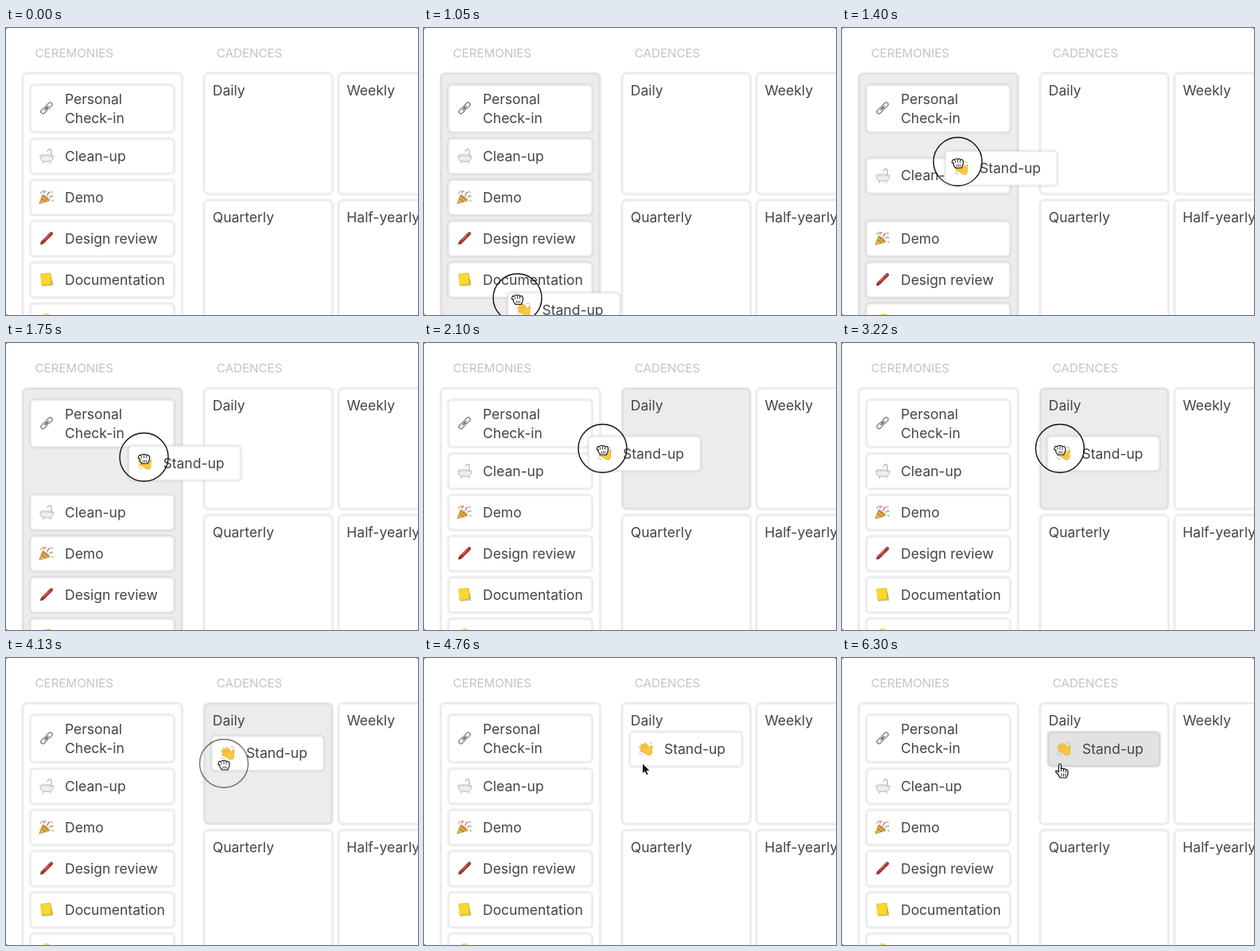
Animation of 518x362 px, one loop 6.79 s. Source, as an HTML page with a canvas:

```html
<!DOCTYPE html>
<html lang="en">
<head>
<meta charset="utf-8">
<title>Ceremony planner</title>
<style>
  html, body { margin: 0; width: 100%; height: 100%; overflow: hidden; background: #fff; }
  canvas { display: block; width: 518px; height: 362px; }
</style>
</head>
<body>
<canvas id="stage" width="518" height="362"></canvas>
<script>
const ctx = document.getElementById('stage').getContext('2d');
const LOOP = 6790, STEP = 70;
const INK = '#444';

const clamp = v => Math.max(0, Math.min(1, v));
const ramp = (t, from, to) => clamp((t - from) / (to - from));
const smooth = u => u * u * (3 - 2 * u);
const mix = (a, b, u) => a + (b - a) * u;
const easeOut = power => u => 1 - (1 - u) ** power;
const linear = u => u;
const grey = (a, b, u) => { const v = Math.round(mix(a, b, u)); return `rgb(${v},${v},${v})`; };

// Keys are [time, value, easing into the key].
function track(t, keys) {
  let value = keys[0][1];
  for (let i = 1; i < keys.length; i++) {
    const [time, next, ease = linear] = keys[i];
    value = mix(value, next, ease(ramp(t, keys[i - 1][0], time)));
    if (t < time) break;
  }
  return value;
}

function at(x, y, draw) {
  ctx.save();
  ctx.translate(x, y);
  draw();
  ctx.restore();
}

function path(d, fill, stroke, width = 1) {
  const p = new Path2D(d);
  ctx.lineCap = ctx.lineJoin = 'round';
  ctx.lineWidth = width;
  if (fill) { ctx.fillStyle = fill; ctx.fill(p); }
  if (stroke) { ctx.strokeStyle = stroke; ctx.stroke(p); }
}

// Soft border: a wide faint line under a narrow darker one.
function box(x, y, w, h, fill = '#fff', radius = 5) {
  ctx.beginPath();
  ctx.roundRect(x, y, w, h, radius);
  ctx.fillStyle = fill;
  ctx.fill();
  for (const [width, color] of [[4, 'rgba(0,0,0,.04)'], [2, 'rgba(0,0,0,.04)']]) {
    ctx.lineWidth = width;
    ctx.strokeStyle = color;
    ctx.stroke();
  }
}

function text(str, x, y, size = 17.5, color = INK) {
  ctx.font = `${size}px Inter, sans-serif`;
  ctx.fillStyle = color;
  ctx.fillText(str, x, y);
}

const icons = {
  link() {
    const oval = 'M-2-2.5H2A2.5 2.5 0 0 1 2 2.5H-2A2.5 2.5 0 0 1-2-2.5Z';
    ctx.rotate(-Math.PI / 4);
    for (const x of [-4.5, 4.5]) at(x, 0, () => path(oval, null, '#8b8e91', 1.5));
    path('M-3 0H3', null, '#6f7275', 1.6);
  },
  bath() {
    path('M-8 0H9Q8 7 4 7H-3Q-8 7-8 0Z', '#eceeef', '#b4b8ba', 1);
    path('M-4 8V9M5 8V9M6 0V-6Q6-9 3-8L1-6', null, '#b0b4b6', 1.3);
    path('M-6-1H3', null, '#d5dde2', 3);
  },
  popper() {
    path('M-9 8L-5-3Q1-1 4 4Z', '#e5b044', '#a8752f', .7);
    path('M-6 2L-1 6M-4-1L2 4', null, '#8f6232', 1);
    path('M-3-5Q-4-8-1-7M1-2Q2-6 4-6', null, '#cc6d7c', 1.3);
    path('M4 0Q6-2 8-1M-7-6L-7-5', null, '#6b9bc0', 1.3);
    path('M7 4L8 5M6-7L7-6M-5-8V-7', null, '#dda64a', 1.5);
  },
  crayon() {
    path('M-5 5L6-6', null, '#a83a34', 4.4);
    path('M-4 3L5-6', null, '#d5665a', 1.2);
    path('M-8 8L-7 4L-4 7Z', '#7d2a27');
    path('M-4 2L-2 4M3-5L5-3', null, '#6b2523', 1);
  },
  notebook() {
    path('M-7-7L5-8L8 6L-5 8Z', '#c4a01c');
    path('M-7-7L5-8L6 6L-6 7Z', '#f8d92e', '#dcb820', .6);
    path('M-5 8L8 7', null, '#c9bb86', 1);
  },
  bulb() {
    path('M-6-2A6 7 0 1 1 6-2Q6 2 3 6H-3Q-6 2-6-2Z', '#f9e272', '#e6cc5c', .8);
  },
  wave() {
    const fingers = 'M1 5L-6 2M2 3L-7-2M3 2L-5-5M5 1L-1-6M6 4L7-3';
    path(fingers, null, '#d9a032', 3);
    path('M0 1Q3-2 7 1Q9 5 6 8Q2 9-1 6Z', '#fbc840', '#d9a032', .6);
    path(fingers, null, '#fbc840', 2.2);
    path('M-8 5Q-7 8-4 8M4-8Q7-8 8-6', null, '#a3a7ab', .8);
  }
};

const cursors = {
  arrow() { path('M0 0V13L3 10.3L5.2 15L7.6 14L5.5 9.4H9.5Z', '#111', '#fff', 1); },
  hand() {
    path('M-3.5 2V-7Q-3.5-8.5-2-8.5T-.5-7V-2Q1-3.5 2.5-2Q4-3 5.5-1Q8-2 8 1V4Q8 6 6 9H-2Q-3 6-7 2Q-8 0-6 0Z', '#fff', '#111', 1.2);
    path('M-.5-2V1M2.5-2V1M5.5-1V2M0 4V7M2.5 4V7M5 4V7', null, '#111', .9);
  },
  grab() {
    path('M-5 0Q-8 0-7-2Q-6-6-4-4Q-2-7 0-5Q2-7 3-4Q6-6 7-2Q7 3 5 5V6H-3V5Q-6 3-5 0Z', '#fff', '#111', 1.1);
    path('M-3-3V-1M0-4V-1M3-3V-1M-1 2V4M1 2V4M3 2V4', null, '#111', .8);
  }
};

function card(x, y, w, h, icon, lines, fill) {
  box(x, y, w, h, fill);
  at(x + 20.5, y + h / 2 - .5, icons[icon]);
  lines.forEach((line, i) => text(line, x + 43.5, y + 28 + i * 24 - (lines.length > 1 ? 4 : 0)));
}

const items = [
  ['bath', 'Clean-up'], ['popper', 'Demo'], ['crayon', 'Design review'],
  ['notebook', 'Documentation'], ['bulb', '']
];

function drawBoard(t, dragY) {
  text('CEREMONIES', 36.5, 37, 15.15, '#c4c4c4');
  text('CADENCES', 264.8, 37, 15.15, '#c4c4c4');

  const overList = ramp(t, 350, 630) * (1 - ramp(t, 1820, 2030));
  const overDaily = ramp(t, 1890, 2100) * (1 - ramp(t, 4340, 4480));
  box(21, 57, 200.5, 400, grey(255, 236, overList), 6);
  box(249, 57, 161.5, 152.5, grey(255, 236, overDaily), 6);
  box(418, 57, 161.5, 152.5, '#fff', 6);
  box(249, 217, 161.5, 200, '#fff', 6);
  box(418, 217, 161.5, 200, '#fff', 6);
  text('Daily', 259.8, 85);
  text('Weekly', 428.5, 85);
  text('Quarterly', 259.8, 245);
  text('Half-yearly', 428.3, 245);

  card(30.5, 71.5, 181, 60, 'link', ['Personal', 'Check-in']);
  items.forEach(([icon, label], i) => {
    const y = 139.5 + 52 * i;
    // Items below the dragged card make room for it.
    const room = clamp((y + 30 - dragY) / 30) * overList;
    card(30.5, y + 52 * smooth(room), 181, 44.5, icon, [label]);
  });
}

function drawPointer(t) {
  if (t >= 70 && t < 420) {
    at(track(t, [[70, 448], [420, 270]]), track(t, [[70, 300], [420, 375]]), cursors.arrow);
  } else if (t >= 1050 && t < 4480) {
    const x = track(t, [[1050, 117.5], [1750, 173.5], [2100, 224.5], [3080, 274, easeOut(2)]]);
    const y = track(t, [[1050, 340.5], [1750, 144, easeOut(3)], [2100, 133], [2600, 131.5, smooth], [3150, 133, smooth]]);
    at(x, y + 2, cursors.grab);
    ctx.globalAlpha = 1 - ramp(t, 3990, 4340);
    ctx.beginPath();
    ctx.arc(x, y, 30.5, 0, 7);
    ctx.lineWidth = 1.4;
    ctx.strokeStyle = '#111';
    ctx.stroke();
    ctx.globalAlpha = 1;
  } else if (t >= 4480) {
    if (t < 5530) at(274.5, 133, cursors.arrow);
    else at(276, 142, cursors.hand);
  }
}

function draw(t) {
  ctx.fillStyle = '#777';
  ctx.fillRect(0, 0, 518, 362);
  ctx.beginPath();
  ctx.roundRect(0, 0, 518, 362, 3);
  ctx.fillStyle = '#fff';
  ctx.fill();

  const x = track(t, [[1050, 105], [1750, 154], [2100, 206.5], [3080, 258, easeOut(2)], [3990, 258], [4340, 258.5, easeOut(3)]]);
  const y = t < 1050 ? 500 : track(t, [[1050, 333.5], [1750, 129.5, easeOut(3)], [2100, 117.5], [3990, 117.5], [4340, 93, easeOut(3)]]);
  drawBoard(t, y);
  card(x, y, 141.5, 44, 'wave', ['Stand-up'], grey(255, 226, ramp(t, 5460, 5810)));
  drawPointer(t);
}

const start = performance.now();
function frame() {
  const t = (performance.now() - start) % LOOP;
  draw(Math.floor(t / STEP) * STEP);
  requestAnimationFrame(frame);
}
frame();
</script>
</body>
</html>
```
